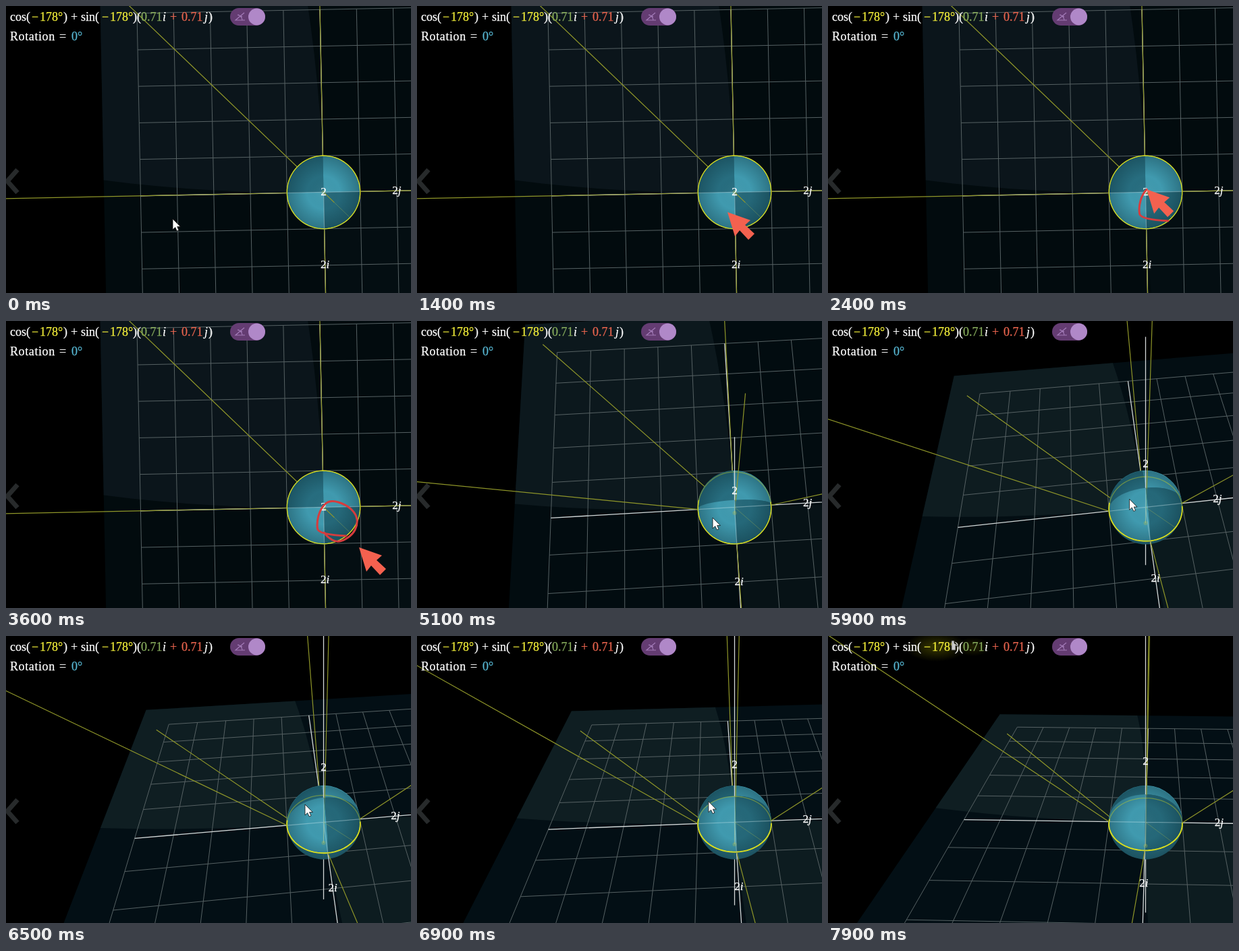
Animation of 600x426 px, one loop 8000 ms. Source, as an HTML page:

```html
<!DOCTYPE html>
<html lang="en">
<head>
<meta charset="utf-8">
<title>Quaternion rotation</title>
<style>
html, body { margin: 0; width: 100%; height: 100%; overflow: hidden; background: #000; }
svg { display: block; width: 100vw; height: 100vh; }
text { font: 18px "Liberation Serif", "Times New Roman", serif; stroke-width: .25; }
.label { text-anchor: middle; fill: #fff; stroke: #fff; font-size: 17px; }
.italic { font-style: italic; }
.line { fill: none; stroke-linejoin: round; }
</style>
</head>
<body>
<svg id="stage" viewBox="0 0 600 426">
  <defs>
    <radialGradient id="shade">
      <stop offset="0" stop-color="#bdeaf5" stop-opacity=".06"/>
      <stop offset=".45" stop-color="#052028" stop-opacity="0"/>
      <stop offset="1" stop-color="#052028" stop-opacity=".32"/>
    </radialGradient>
    <radialGradient id="haze">
      <stop offset="0" stop-color="#c8c800" stop-opacity=".28"/>
      <stop offset="1" stop-color="#c8c800" stop-opacity="0"/>
    </radialGradient>
  </defs>
  <g id="scene"></g>
  <path d="M17 243L2 260L17 277" fill="none" stroke="#272a2b" stroke-width="7"/>
  <g id="haze-spots">
    <ellipse cx="160" cy="16" rx="46" ry="22" fill="url(#haze)"/>
    <ellipse cx="215" cy="16" rx="26" ry="14" fill="url(#haze)" opacity=".6"/>
  </g>
  <g id="formula"></g>
  <rect x="332" y="3" width="52" height="26" rx="13" fill="#643c72"/>
  <circle cx="371.5" cy="16" r="12.5" fill="#b088c8"/>
  <path d="M353 10L340 21H354M344 13A10 10 0 0 1 350 21M350 16L343 13" fill="none" stroke="#a37bb8" stroke-width="1.2"/>
  <path id="scribble" class="line" stroke="#d63c3d" stroke-width="3" stroke-linecap="round"/>
  <path id="pen" d="M0 0L34 12L26 19L40 32L31 41L18 27L11 36Z" fill="#f4614f"/>
  <path id="pointer" d="M0 0V16L3.7 12.6L6.2 18L9 16.8L6.6 11.6H11.4Z" fill="#fff" stroke="#111" stroke-width=".8"/>
  <path id="grab" d="M-2 -6H2V-2L8 1V3L4 1V8H-2Z" fill="#ccc" stroke="#333" stroke-width=".8"/>
</svg>
<script>
const LOOP = 8000, FOCAL = 488, DIST = 9, CX = 470.5, CY = 276.4;
const NS = 'http://www.w3.org/2000/svg';
const $ = id => document.getElementById(id);

function add(parent, tag, attrs, text) {
  const el = document.createElementNS(NS, tag);
  for (const k in attrs) el.setAttribute(k, attrs[k]);
  if (text) el.textContent = text;
  parent.append(el);
  return el;
}
const shape = attrs => add($('scene'), 'path', attrs);
const stroke = (color, width, opacity = 1) =>
  shape({ class: 'line', stroke: color, 'stroke-width': width, opacity });
const fill = color => shape({ fill: color });

// Header formula
const WHITE = '#fff', YELLOW = '#f6f23a', GREEN = '#86ab5c', RED = '#e9644e', BLUE = '#58b8d4';
const word = (x, y, color, text, attrs) =>
  add($('formula'), 'text', { x, y, fill: color, stroke: color, ...attrs }, text);
const italic = { class: 'italic' };
const angle = x => {
  word(x, 22, YELLOW, '−');
  word(x + 12, 22, YELLOW, '178°');
};
word(6, 22, WHITE, 'cos(');
angle(38);
word(85, 22, WHITE, ')');
word(96, 22, WHITE, '+');
word(111, 22, WHITE, 'sin(');
angle(142);
word(188, 22, WHITE, ')(');
word(200, 22, GREEN, '0.71');
word(232, 22, WHITE, 'i', italic);
word(243, 22, RED, '+');
word(260, 22, RED, '0.71');
word(294, 22, WHITE, 'j', italic);
word(300, 22, WHITE, ')');
word(6, 51, WHITE, 'Rotation', { 'letter-spacing': .6 });
word(79, 51, WHITE, '=');
word(97, 51, BLUE, '0°');

// Scene layers, back to front
const RAY = '#8f9629';
const floor = fill(), nearFloor = fill(), farFloor = fill();
const grid = stroke('#566163', 1), axes = stroke('#d4d8d8', 1.3), zLow = stroke('#d4d8d8', 1.3);
const backRays = stroke(RAY, 1.2);
const ball = { cx: CX, cy: 277, r: 54.5 };
add($('scene'), 'circle', { ...ball, fill: '#2b7082', opacity: .95 });
const quads = ['#409aaf', '#276d7f', '#409aaf', '#256879'].map(fill);
add($('scene'), 'circle', { ...ball, fill: 'url(#shade)' });
const innerAxes = stroke('#dff2f5', 1.2, .35), innerRays = stroke('#b9c24a', 1, .3);
const pole = add($('scene'), 'circle', { r: 3, fill: '#b9c24a', opacity: .3 });
const backRing = stroke('#d8dc20', 1.3, .4), frontRing = stroke('#dade1e', 1.6);
const frontAxes = stroke('#d4d8d8', 1.3), frontRays = stroke(RAY, 1.2);
const labels = [['2', [0, 0, 2]], ['i', [0, -2, 0]], ['j', [2, 0, 0]]].map(([name, at]) => {
  const el = add($('scene'), 'text', { class: 'label' }, '2');
  if (name !== '2') add(el, 'tspan', italic, name);
  return { el, at };
});

// Camera
let cosYaw, sinYaw, cosEl, sinEl;
function setCamera(yaw, elevation) {
  const r = Math.PI / 180;
  cosYaw = Math.cos(yaw * r); sinYaw = Math.sin(yaw * r);
  cosEl = Math.cos(elevation * r); sinEl = Math.sin(elevation * r);
}
function view([x, y, z]) {
  const right = x * cosYaw - y * sinYaw, away = x * sinYaw + y * cosYaw;
  return [right, away * sinEl + z * cosEl, DIST + away * cosEl - z * sinEl];
}
function project(p) {
  const [right, up, depth] = view(p), s = FOCAL / depth;
  return [CX + right * s, CY - up * s];
}
const poly = points => 'M' + points.map(p => project(p).map(v => v.toFixed(2)).join(' ')).join('L');
const mix = (a, b, k) => a.map((v, i) => v + (b[i] - v) * k);
// Segment cut just before it passes the camera
function seg(a, b) {
  const da = view(a)[2], db = view(b)[2], near = .4;
  return poly([a, db < near ? mix(a, b, (da - near) / (da - db)) : b]);
}
const draw = (el, d) => el.setAttribute('d', d);
const range = (n, f) => Array.from({ length: n + 1 }, (_, i) => f(i / n));

// Hidden surface points slide out to the visible limb
function toLimb(p) {
  const c = [-cosEl * sinYaw, -cosEl * cosYaw, sinEl];
  const dot = p[0] * c[0] + p[1] * c[1] + p[2] * c[2];
  if (dot >= 1 / DIST) return p;
  const q = p.map((v, i) => v - dot * c[i]), k = Math.sqrt(1 - 1 / DIST ** 2) / Math.hypot(...q);
  return q.map((v, i) => v * k + c[i] / DIST);
}
const onSphere = (lon, lat) =>
  [Math.cos(lat) * Math.cos(lon), Math.cos(lat) * Math.sin(lon), Math.sin(lat)];

const SOUTH = [0, 0, -1], O = [0, 0, 0], H = Math.PI / 2;
const rayPoint = (x, y, t) => [x * t, y * t, t - 1];
const ray = (x, y) => seg(rayPoint(x, y, 1), rayPoint(x, y, 40));
// One bent quarter of the floor; sign -1 gives the opposite one
function quarter(sign) {
  const bend = k => .45 * k * k;
  const side = range(8, k => [-6 * k * sign, bend(k) * sign, 0]);
  const top = range(8, k => [-bend(1 - k) * sign, 6 * (1 - k) * sign, 0]);
  return poly([...side, [-6 * sign, 6 * sign, 0], ...top]) + 'Z';
}
// The floor catches more light as the view tilts
const tint = (el, flat, tilted) =>
  el.setAttribute('fill', `rgb(${mix(flat, tilted, Math.min(1, cosEl / .62)).map(Math.round)})`);

function drawScene() {
  draw(floor, poly([[-6, -6, 0], [6, -6, 0], [6, 6, 0], [-6, 6, 0]]) + 'Z');
  draw(farFloor, quarter(1));
  draw(nearFloor, quarter(-1));
  tint(floor, [2, 11, 14], [3, 15, 21]);
  tint(farFloor, [11, 21, 27], [15, 30, 34]);
  tint(nearFloor, [4, 14, 18], [13, 28, 32]);

  let d = '';
  for (let i = -5; i <= 5; i++)
    if (i) d += poly([[i, -5, 0], [i, 5, 0]]) + poly([[-5, i, 0], [5, i, 0]]);
  draw(grid, d);
  draw(axes, poly([[-5, 0, 0], [5, 0, 0]]) + poly([O, [0, 5, 0]]));
  draw(zLow, poly([[0, 0, -4.9], O]));
  draw(backRays, ray(0, 1) + seg(SOUTH, [-5.95, 5.95, -.85]));

  quads.forEach((el, i) => {
    const lon = i * H;
    draw(el, poly([
      ...range(12, k => onSphere(lon, H * (1 - k))),
      ...range(12, k => onSphere(lon + H * k, 0)),
      ...range(12, k => onSphere(lon + H, H * k))
    ].map(toLimb)) + 'Z');
  });

  draw(innerAxes, poly([O, [1, 0, 0]]) + poly([O, [-1, 0, 0]]) + poly([O, [0, -1, 0]]) +
    poly([SOUTH, [0, 0, 1]]));
  draw(innerRays, poly([O, [.707, -.707, 0]]) + poly([SOUTH, rayPoint(.0124, -.0124, 2)]));
  const [px, py] = project(SOUTH);
  pole.setAttribute('cx', px);
  pole.setAttribute('cy', py);

  const ring = range(72, k => onSphere(k * 4 * H, 0));
  draw(backRing, poly(ring));
  draw(frontRing, ring.slice(1).map((p, i) =>
    view(p)[2] < DIST + .03 ? poly([ring[i], p]) : '').join(''));
  frontRing.setAttribute('stroke-width', 1.2 + cosEl);

  draw(frontAxes, poly([[0, -1, 0], [0, -5, 0]]) + poly([[0, 0, 1], [0, 0, 5]]));
  draw(frontRays, ray(-1, 0) + ray(1, 0) + ray(0, -1) +
    seg(rayPoint(.0124, -.0124, 2), rayPoint(.0124, -.0124, 7.2)));

  for (const { el, at } of labels) {
    const [x, y] = project(at);
    el.setAttribute('x', x);
    el.setAttribute('y', y + 4.5);
  }
}

// Motion: rows of [time, ...values]
function track(rows, t, ease = k => k) {
  if (t <= rows[0][0]) return rows[0].slice(1);
  const i = rows.findIndex(r => r[0] > t);
  if (i < 0) return rows[rows.length - 1].slice(1);
  const a = rows[i - 1], b = rows[i];
  return mix(a.slice(1), b.slice(1), ease((t - a[0]) / (b[0] - a[0])));
}
const smooth = k => k * k * (3 - 2 * k);
const CAMERA = [[4700, 1.15, 90], [5100, 3.4, 80], [5500, 7.5, 67.8], [6500, 6.2, 52], [7400, -1.15, 45.5]];
const POINTER = [[300, 247, 316], [1100, 460, 306], [3900, 523, 336], [4500, 432, 306], [4700, 432, 306],
  [5100, 438, 292], [5500, 449, 274], [6500, 443, 250], [7400, 418, 240], [7850, 185, 13]];
const LOOP_MARK = [[504, 319], [463, 317], [460, 300], [466, 278], [480, 265], [505, 273],
  [519, 287], [521, 302], [513, 318], [492, 330], [475, 320], [468, 308]];
const PEN_DOWN = 1900, PEN_UP = 3200, CLEAR = 3700;

const mid = (a, b) => mix(a, b, .5);
draw($('scribble'), 'M' + LOOP_MARK[0] + LOOP_MARK.slice(1, -1).map((p, i) =>
  'Q' + p + ' ' + mid(p, LOOP_MARK[i + 2])).join(''));
const markLength = $('scribble').getTotalLength();

const show = (el, on) => el.setAttribute('visibility', on ? 'visible' : 'hidden');
function place(id, [x, y], on) {
  $(id).setAttribute('transform', `translate(${x} ${y})`);
  show($(id), on);
}

function penTip(t, drawn) {
  if (t < PEN_DOWN) return track([[1500, 460, 306], [PEN_DOWN, 504, 319]], t, smooth);
  const p = $('scribble').getPointAtLength(drawn);
  return t < PEN_UP ? [p.x, p.y] : track([[PEN_UP, p.x, p.y], [3500, 523, 336]], t, smooth);
}

function render(t) {
  setCamera(...track(CAMERA, t));
  drawScene();

  const drawn = markLength * Math.min(1, Math.max(0, (t - PEN_DOWN) / (PEN_UP - PEN_DOWN)));
  $('scribble').setAttribute('stroke-dasharray', `${drawn} ${markLength + 9}`);
  show($('scribble'), t > PEN_DOWN && t < CLEAR);

  const penMode = t >= 1100 && t < 3900, hover = t >= 7800;
  const at = track(POINTER, t, t < 4700 || t > 7400 ? smooth : undefined);
  place('pen', penTip(t, drawn), penMode);
  place('pointer', at, !penMode && !hover);
  place('grab', at, hover);
  show($('haze-spots'), hover);
}

const start = performance.now();
function tick() {
  render((performance.now() - start) % LOOP);
  requestAnimationFrame(tick);
}
tick();
</script>
</body>
</html>
```
